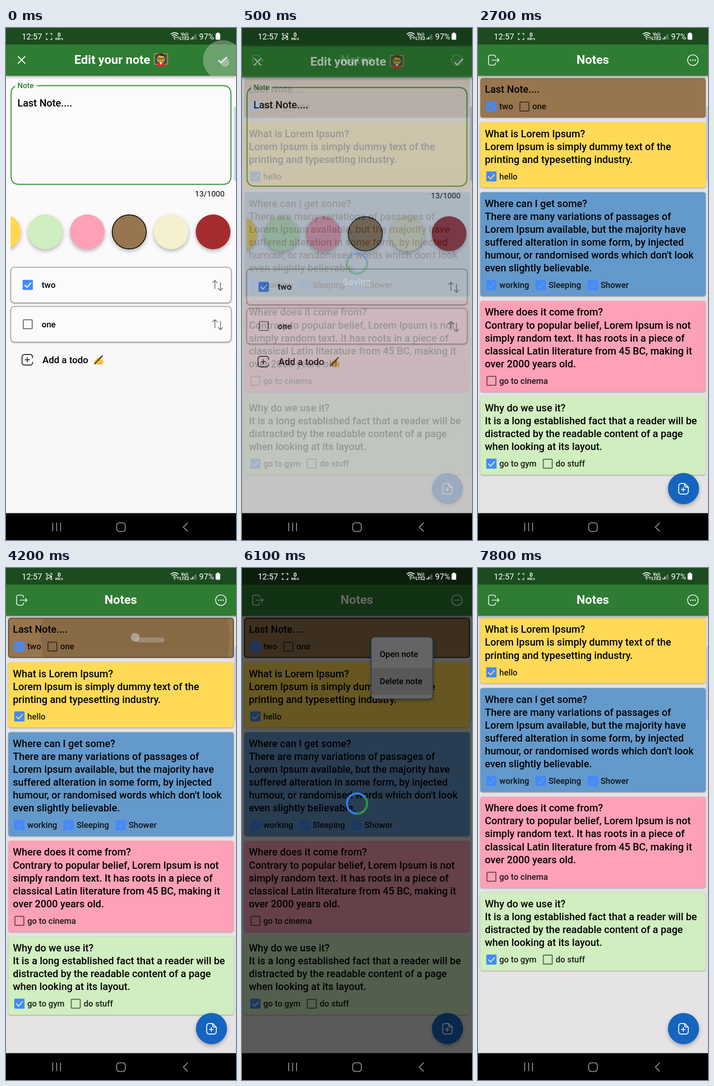
Animation, 502 px wide and 1115 px high, one loop 8000 ms. Source, as an HTML page:

```html
<!DOCTYPE html>
<html lang="en">
<head>
<meta charset="utf-8">
<title>Notes app</title>
<style>
  html, body { margin: 0; width: 100%; height: 100%; overflow: hidden; background: #000; }
  svg { display: block; width: 502px; height: 1115px; font-family: Roboto, sans-serif; font-weight: 500; }
  .line { fill: none; stroke-linecap: round; stroke-linejoin: round; }
  .bar { filter: drop-shadow(0 2px 3px rgba(0,0,0,.4)); }
  .card { filter: drop-shadow(0 1.5px 1.5px rgba(0,0,0,.35)); }
  .disc { filter: drop-shadow(0 4px 4px rgba(0,0,0,.28)); }
</style>
</head>
<body>
<svg id="stage" viewBox="0 0 502 1115" xmlns="http://www.w3.org/2000/svg"></svg>
<script>
const LOOP = 8000;
const LINE = 28.1;
const GREEN = '#2e7d32', BLUE = '#448aff';

const text = (x, y, size, str, attrs = '') => `<text x="${x}" y="${y}" font-size="${size}" ${attrs}>${str}</text>`;
const rect = (x, y, w, h, r, attrs) => `<rect x="${x}" y="${y}" width="${w}" height="${h}" rx="${r}" ${attrs}/>`;
const circle = (x, y, r, attrs) => `<circle cx="${x}" cy="${y}" r="${r}" ${attrs}/>`;
const line = (d, color, width = 2, attrs = '') => `<path class="line" d="${d}" stroke="${color}" stroke-width="${width}" ${attrs}/>`;

function checkbox(x, cy, checked, tick) {
  return checked
    ? rect(x, cy - 11, 22.5, 22, 2, `fill="${BLUE}"`) + line(`M${x + 4.5} ${cy}l5 5.2l9-10`, tick, 2.3, 'style="stroke-linecap:butt;stroke-linejoin:miter"')
    : rect(x + 1.5, cy - 9.7, 19.5, 19.5, 1.5, 'fill="none" stroke="#000" stroke-opacity=".53" stroke-width="2.3"');
}

const notes = [
  { color: '#97754d', lines: ['Last Note....'], todos: [[18, 'two', 1], [90, 'one', 0]] },
  { color: '#ffda56', lines: ['What is Lorem Ipsum?', 'Lorem Ipsum is simply dummy text of the', 'printing and typesetting industry.'], todos: [[18, 'hello', 1]] },
  { color: '#6499cb', lines: ['Where can I get some?', 'There are many variations of passages of', 'Lorem Ipsum available, but the majority have',
    'suffered alteration in some form, by injected', 'humour, or randomised words which don\'t look', 'even slightly believable.'],
    todos: [[18, 'working', 1], [125.5, 'Sleeping', 1], [239, 'Shower', 1]] },
  { color: '#fca1b7', lines: ['Where does it come from?', 'Contrary to popular belief, Lorem Ipsum is not', 'simply random text. It has roots in a piece of',
    'classical Latin literature from 45 BC, making it', 'over 2000 years old.'], todos: [[18, 'go to cinema', 0]] },
  { color: '#d0eec0', lines: ['Why do we use it?', 'It is a long established fact that a reader will be', 'distracted by the readable content of a page',
    'when looking at its layout.'], todos: [[18, 'go to gym', 1], [141, 'do stuff', 0]] },
];
const noteHeight = note => 58 + LINE * note.lines.length;

function noteCard(note, top) {
  const base = top + 32.4;
  const cy = base + LINE * (note.lines.length - 1) + 29.6;
  return rect(5, top, 492, noteHeight(note), 5, `class="card" fill="${note.color}"`)
    + note.lines.map((s, i) => text(15, base + i * LINE, 21.96, s)).join('')
    + note.todos.map(([x, label, done]) => checkbox(x, cy, done, note.color) + text(x + 28.5, cy + 6.4, 18.3, label, 'fill-opacity=".88"')).join('');
}

function cardList() {
  let top = 109;
  return notes.map((note, i) => {
    const card = noteCard(note, top);
    top += noteHeight(note) + 10;
    return i ? card : `<g id="lastNote">${card}</g><g id="otherNotes">`;
  }).join('') + '</g>';
}

const appBar = () => `<g class="bar">${rect(0, 0, 502, 104, 0, `fill="${GREEN}"`)}</g>` + rect(0, 0, 502, 36, 0, 'fill="#1b4b1f"');

const notesPage = () => rect(0, 0, 502, 1057, 0, 'fill="#e5e3e5"') + cardList()
  + rect(5.5, 109.2, 491, 85.5, 6, 'id="focus" fill="none" stroke="#000" stroke-width="1.6"')
  + `<g clip-path="url(#firstCard)">${circle(282, 151, 0, 'id="cardRipple" fill="#000"')}</g>`
  + appBar() + text(250.5, 78, 26.7, 'Notes', 'font-weight="700" fill="#fff" text-anchor="middle"')
  + line('M38 64v-1q0-4-4-4h-6q-5 0-5 5v12q0 5 5 5h6q4 0 4-4v-1M31 70h15M42 66l4 4-4 4', '#fff', 1.6)
  + circle(469, 70, 11.5, 'fill="none" stroke="#fff" stroke-width="1.7"')
  + [464, 469, 474].map(x => circle(x, 70, 1.5, 'fill="#fff"')).join('')
  + circle(448.5, 1003, 34, 'class="disc" fill="#1565c0"')
  + line('M451 992h-7q-6 0-6 6v11q0 6 6 6h9q6 0 6-6v-9l-8-8v4q0 4 4 4h4M444 1005h8M448 1001v8', '#fff', 1.9);

const teacher = () => rect(323.5, 56, 29, 23, 1, 'fill="#315c57" stroke="#c88b4c" stroke-width="2"')
  + '<path d="M328 84q0-9 10-9t10 9z" fill="#c8372d"/><path d="M335 75l3 5 3-5z" fill="#fff"/>'
  + circle(338, 67, 8.5, 'fill="#f4b63e"') + '<path d="M329 67q-2-12 9-12t9 12l-3-6q-7 1-10-2z" fill="#4a302a"/>'
  + line('M331 67h14', '#3c2a25', 1) + circle(334.5, 67, 2.7, 'fill="none" stroke="#3c2a25"') + circle(341.5, 67, 2.7, 'fill="none" stroke="#3c2a25"')
  + line('M335 72q3 2 6 0', '#7c3d21', 1.2);

const writingHand = () => '<path d="M192 726l8-8 6-1 2 4 5 5q1 6-5 7h-9l-7-3z" fill="#f9c83e"/>'
  + line('M194 731l16-17', '#5c3b2c', 3) + line('M198 727l7-3 3 2M199 731l8-2', '#d59a28', 1);

function todoRow(y, label, done) {
  const cy = y + 38.6;
  return rect(10.5, y, 481, 77.5, 8, 'class="card" fill="#fcfafc" stroke="#999" stroke-width="1.4"')
    + checkbox(36.2, cy, done, '#fff') + text(78, cy + 6.4, 18.3, label)
    + line(`M456 ${cy + 8}v-18m-5 5l5-5 5 5M468 ${cy - 6}v18m-5-5l5 5 5-5`, '#777', 1.7);
}

function swatches() {
  const colors = ['#ffd954', '#d0eec0', '#fda1b7', '#97754d', '#f5f0cd', '#a52c2e'];
  return `<g clip-path="url(#swatchArea)">${colors.map((c, i) =>
    circle(-5.5 + 91.5 * i, 444, i === 3 ? 37.2 : 38, `class="disc" fill="${c}" ${i === 3 ? 'stroke="#000" stroke-width="1.7"' : ''}`)).join('')}</g>`;
}

const editPage = () => rect(0, 0, 502, 1057, 0, 'fill="url(#paper)"') + appBar()
  + `<g clip-path="url(#barArea)">${circle(473, 69.5, 43, 'id="ripple" fill="#d8e4d8"')}</g>`
  + line('M26.500 62l15 15m0-15l-15 15', '#fff', 2)
  + text(149, 78, 26.7, 'Edit your note', 'font-weight="700" fill="#fff"') + teacher()
  + line('M463.500 70l6 6 13-13', '#fff', 2.5, 'style="stroke-linecap:butt;stroke-linejoin:miter"')
  + line('M67 125.500H473q18 0 18 18V322.500q0 18-18 18H29q-18 0-18-18V143.500q0-13 9-16.500', '#43a047', 2.5, 'style="stroke-linecap:butt"')
  + text(25, 130.5, 16.4, 'Note', `fill="${GREEN}"`) + text(25, 171, 21.96, 'Last Note....')
  + text(477, 367, 17.1, '13/1000', 'font-weight="400" text-anchor="end"')
  + swatches() + todoRow(521, 'two', 1) + todoRow(606.5, 'one', 0)
  + line('M58 718v-1q0-6-6-6H41q-6 0-6 6v11q0 6 6 6h11M58 728q0 6-5 6M42 722.500h9M46.500 718v9', '#222', 1.9)
  + text(79.5, 729.5, 20.6, 'Add a todo') + writingHand();

const menu = () => `<g id="menu"><g class="disc">${rect(282, 150.5, 134.5, 134.5, 8, 'id="menuBox" fill="#fdfbfd" stroke="#4b8fd3" stroke-width="1.5"')}</g>
  <g clip-path="url(#menuArea)">${rect(283, 218, 133, 58, 0, 'id="pressed" fill="#e0dee0"')}
  ${text(300.5, 194.3, 18.3, 'Open note')}${text(300.5, 252.8, 18.3, 'Delete note')}</g></g>`;

function statusBar() {
  const white = 'fill="#fff"';
  const arcs = [10, 6.5, 3].map(r => line(`M${368 - r * .8} ${23 - r}q${r * .8}-${r * .55} ${r * 1.6} 0`, '#fff', 1.8)).join('');
  const bars = [0, 1, 2, 3].map(i => rect(403 + i * 3.4, 22 - i * 3, 2, 3 + i * 3, .5, `fill="#fff" fill-opacity="${i < 2 ? 1 : .4}"`)).join('');
  return text(34.5, 25, 17.8, '12:57', white + ' font-weight="400"')
    + line('M88 15v-3h3M97 12h3v3M100 22v3h-3M91 25h-3v-3', '#fff', 1.4)
    + `<g id="camera">${rect(90, 15.5, 6.5, 6.5, 1, 'fill="none" stroke="#fff" stroke-width="1.3"')}<path d="M97 18l3-2v6l-3-2z" fill="#fff"/></g>`
    + text(116, 19, 12, '0', white + ' font-weight="700" text-anchor="middle"')
    + text(116, 26, 7.8, 'KB/s', white + ' font-weight="700" text-anchor="middle"')
    + arcs + circle(368, 23.5, 1.5, white) + line('M374 24v-5m-1.500 1.500l1.500-1.500 1.500 1.500M377 19v5', '#fff', 1)
    + text(390, 16.5, 8.5, 'Vo))', white + ' font-weight="700" text-anchor="middle"')
    + text(389.500, 25.5, 9.5, 'LTE2', white + ' font-weight="700" text-anchor="middle"') + bars
    + text(421.5, 25, 17.6, '97%', white + ' font-weight="400"')
    + rect(457.5, 12, 10, 13.5, 1.5, white) + rect(460, 10, 5, 3, .5, white);
}

const navBar = () => rect(0, 1056.5, 502, 59, 0, 'fill="#000"')
  + line('M102 1078v17m8.500-17v17m8.500-17v17M396 1078l-9 9 9 9', '#8c8c8c', 2)
  + rect(241.5, 1077.5, 19, 19, 6, 'fill="none" stroke="#8c8c8c" stroke-width="2"');

const clip = (id, shape) => `<clipPath id="${id}">${shape}</clipPath>`;
const stage = document.getElementById('stage');
stage.innerHTML = `<defs>
  <linearGradient id="paper" x1="0" y1="0" x2="0" y2="1"><stop offset=".25" stop-color="#fcfafc"/><stop offset=".8" stop-color="#f9f8f9"/></linearGradient>
  ${clip('barArea', rect(0, 0, 502, 104, 0, ''))}${clip('swatchArea', rect(10, 390, 482, 115, 0, ''))}
  ${clip('firstCard', rect(5, 109, 492, 86, 5, ''))}${clip('menuArea', rect(282, 150.5, 134.5, 134.5, 8, 'id="menuClip"'))}
  ${clip('screen', rect(0, 0, 502, 1057, 0, ''))}</defs>
  <g clip-path="url(#screen)"><g>${notesPage()}</g><g id="editPage">${editPage()}</g>${menu()}
  ${rect(497.5, 171, 8, 162, 4, 'fill="#b9c3e2" fill-opacity=".75"')}
  ${rect(0, 0, 502, 1057, 0, 'id="dim" fill="#000"')}
  <g id="loader">${circle(251, 513, 22, 'fill="none" stroke="#2f80ed" stroke-width="4.5"')}
  ${circle(251, 513, 22, 'id="arc" fill="none" stroke="#2f9140" stroke-width="4.5"')}
  ${text(250.5, 559.5, 20.5, 'Saving', 'id="saving" fill="#fff" text-anchor="middle"')}</g>
  ${statusBar()}${circle(0, 0, 9.5, 'id="touch" fill="#d5d5d5" fill-opacity=".5"')}</g>${navBar()}`;

const el = {};
stage.querySelectorAll('[id]').forEach(node => el[node.id] = node);
const set = (node, attrs) => Object.entries(attrs).forEach(([k, v]) => node.setAttribute(k, v));
const show = (node, on) => node.style.display = on ? '' : 'none';
const ramp = (t, from, to) => Math.min(1, Math.max(0, (t - from) / (to - from)));

function bezier(x1, y1, x2, y2) {
  const at = (a, b, u) => 3 * a * u * (1 - u) ** 2 + 3 * b * u * u * (1 - u) + u ** 3;
  return x => {
    let lo = 0, hi = 1;
    for (let i = 0; i < 20; i++) {
      const mid = (lo + hi) / 2;
      if (at(x1, x2, mid) < x) lo = mid; else hi = mid;
    }
    return at(y1, y2, (lo + hi) / 2);
  };
}
const easeIn = bezier(.42, 0, 1, 1);
const standard = bezier(.4, 0, .2, 1);

function drawEditPage(t) {
  const v = 1 - ramp(t, 454, 754);
  show(el.editPage, v > 0);
  set(el.editPage, { opacity: easeIn(v), transform: `translate(0 ${279 * (1 - standard(v))})` });
  set(el.ripple, { opacity: .36 * (1 - ramp(t, 50, 240)) });
}

function drawLoader(t) {
  const saving = t < 3000;
  const start = saving ? 40 : 5820;
  const end = saving ? 400 : 6300;
  const level = ramp(t, start, start + 150) * (1 - ramp(t, end, end + 150));
  const age = Math.max(0, t - start);
  const sweep = Math.min(270, age * .46);
  set(el.dim, { opacity: .6 * level });
  set(el.loader, { opacity: level });
  set(el.arc, { 'stroke-dasharray': `${22 * sweep * Math.PI / 180} 200`, transform: `rotate(${-90 + age * .175} 251 513)` });
  show(el.saving, saving);
}

function drawList(t) {
  const deleted = t >= 6350;
  show(el.lastNote, !deleted);
  set(el.otherNotes, { transform: `translate(0 ${deleted ? -96.1 : 0})` });
  set(el.focus, {
    height: deleted ? noteHeight(notes[1]) - .5 : 85.5,
    opacity: ramp(t, 4050, 4350) * (1 - ramp(t, 6350, 6720)),
  });
  set(el.cardRipple, { r: 40 + 330 * ramp(t, 4050, 4350), opacity: t < 4080 ? 0 : .1 * (1 - ramp(t, 4200, 4480)) });
}

function drawMenu(t) {
  const v = ramp(t, 4180, 4480) * (1 - ramp(t, 6560, 6880));
  const size = { width: 134.5 * Math.min(1, .4 + 1.2 * v), height: 134.5 * Math.min(1, v * 1.3) };
  show(el.menu, v > 0);
  set(el.menu, { opacity: Math.min(1, v * 3) });
  set(el.menuBox, size);
  set(el.menuClip, size);
  set(el.pressed, { opacity: ramp(t, 5680, 5850) });
}

function drawTouch(t) {
  const spots = [[0, 100, 478, 75], [4080, 4220, 282, 151], [5690, 5800, 348, 248]];
  const spot = spots.find(([from, to]) => t >= from && t < to);
  show(el.touch, spot);
  if (spot) set(el.touch, { cx: spot[2], cy: spot[3] });
}

function draw(t) {
  drawEditPage(t);
  drawList(t);
  drawMenu(t);
  drawLoader(t);
  drawTouch(t);
  show(el.camera, (t + 800) % 1000 < 500);
}

const began = performance.now();
function tick() {
  draw((performance.now() - began) % LOOP);
  requestAnimationFrame(tick);
}
tick();
</script>
</body>
</html>
```
